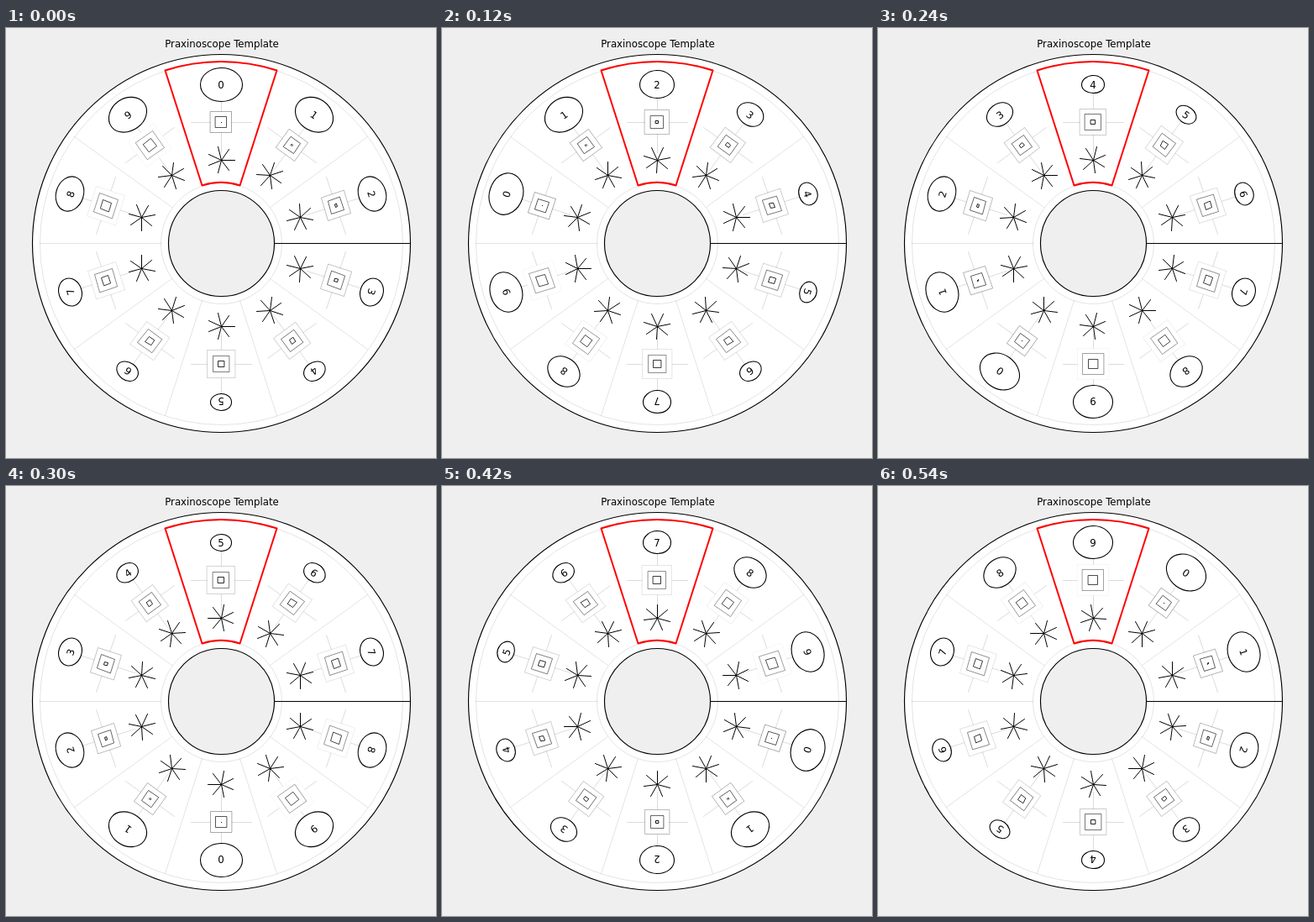
An HTML page that plays this animation: 512 by 512 pixels, repeating every 0.6 s.

```html
<!DOCTYPE html>
<html lang="en">
<head>
<meta charset="utf-8">
<title>Praxinoscope Template</title>
<style>
  html, body { margin: 0; width: 100%; height: 100%; overflow: hidden; background: #efefef; }
  svg { display: block; width: 100vw; height: 100vh; }
  text { font: 11.75px "DejaVu Sans", sans-serif; text-anchor: middle; fill: #000; }
</style>
</head>
<body>
<svg id="stage" viewBox="0 0 512 512" fill="none" stroke-linecap="round">
  <text x="257" y="23">Praxinoscope Template</text>
</svg>
<script>
const COUNT = 10, STEP = 60;
const MID = 256, OUTER = 225, HOLE = 63, RIM = 216, CORE = 72;
const MIDDLE = (RIM + CORE) / 2;
const BOX = 38.8, SPOKES = 7;
const GUIDE = 'rgba(0,0,0,.11)', CROSS = 'rgba(0,0,0,.14)';
const TAU = Math.PI * 2;
const svg = document.getElementById('stage');

function add(parent, tag, attrs) {
  const el = document.createElementNS('http://www.w3.org/2000/svg', tag);
  for (const key in attrs) el.setAttribute(key, attrs[key]);
  parent.appendChild(el);
  return el;
}

// Vertices sit on pixel centres, as in a stroke-normalising renderer.
const snap = v => Math.floor(v + 0.001) + 0.5;
const pair = p => p.map(v => +v.toFixed(3)).join(' ');
const polyline = points => 'M' + points.map(pair).join('L');

function polar(r, a) {
  return [snap(MID + r * Math.cos(a)), snap(MID + r * Math.sin(a))];
}

function ring(r, stroke, fill = 'none', width = 1) {
  add(svg, 'circle', { cx: MID + 0.5, cy: MID + 0.5, r, stroke, fill, 'stroke-width': width });
}

// Local wedge coordinates: origin mid-wedge, y pointing to the hub.
function wedge(slot) {
  const a = slot * TAU / COUNT, c = Math.cos(a), s = Math.sin(a);
  const turn = (x, y) => [x * c - y * s, x * s + y * c];
  const place = (x, y) => turn(x, y - MIDDLE).map(v => MID + v);
  const at = (x, y) => place(x, y).map(snap);
  return { turn, place, at };
}

function ellipsePath(w, y, rx, ry) {
  const k = 0.5523;
  const nodes = [[1, 0], [0, 1], [-1, 0], [0, -1]].map(([u, v]) => ({
    p: w.at(u * rx, y + v * ry),
    t: w.turn(-v * rx * k, u * ry * k)
  }));
  let d = 'M' + pair(nodes[0].p);
  nodes.forEach((n, i) => {
    const m = nodes[(i + 1) % 4];
    const c1 = [n.p[0] + n.t[0], n.p[1] + n.t[1]];
    const c2 = [m.p[0] - m.t[0], m.p[1] - m.t[1]];
    d += 'C' + [c1, c2, m.p].map(pair).join(' ');
  });
  return d + 'Z';
}

function boxPath(w, size) {
  const h = size / 2;
  return polyline([w.at(-h, -h), w.at(h, -h), w.at(h, h), w.at(-h, h)]) + 'Z';
}

// The splat turns back by one spoke per loop.
function splatPath(w, pose) {
  let d = '';
  for (let i = 0; i < SPOKES; i++) {
    const a = (i - pose / COUNT) * TAU / SPOKES;
    d += polyline([w.at(0, 45), w.at(16 * Math.cos(a), 45 + 16 * Math.sin(a))]);
  }
  return d;
}

function makeSlot(slot) {
  const w = wedge(slot);
  const cross = polyline([w.at(-36, 0), w.at(36, 0)]) + polyline([w.at(0, -36), w.at(0, 36)]);
  add(svg, 'path', { d: cross, stroke: CROSS });
  const boxes = [2, 1, 0].map(level => ({
    level, el: add(svg, 'path', { stroke: '#000', fill: level === 2 ? '#fff' : 'none' })
  }));
  const oval = add(svg, 'path', { stroke: '#000', fill: '#fff', 'stroke-width': 1.1 });
  const splat = add(svg, 'path', { stroke: '#000' });
  const [x, y] = w.place(0, -44.5);
  const label = add(svg, 'text', {
    y: 4.3,
    transform: `translate(${x.toFixed(2)} ${y.toFixed(2)}) rotate(${slot * 360 / COUNT})`
  });

  return pose => {
    const diam = 30 + 10 * Math.cos(pose / COUNT * TAU);
    oval.setAttribute('d', ellipsePath(w, -45, diam * 0.625, diam / 2));
    for (const { level, el } of boxes) {
      const grow = (pose + level * COUNT) / (COUNT * 3);
      el.setAttribute('d', boxPath(w, BOX * grow));
      el.setAttribute('stroke-opacity', 1 - grow);
    }
    splat.setAttribute('d', splatPath(w, pose));
    label.textContent = pose;
  };
}

ring(OUTER, '#000', '#fff', 1.15);
ring(RIM, GUIDE);
ring(CORE, GUIDE);
for (let i = 0; i < COUNT; i++) {
  const a = (i + 0.5) * TAU / COUNT - TAU / 4;
  add(svg, 'path', { d: polyline([polar(CORE, a), polar(RIM, a)]), stroke: GUIDE });
}
ring(HOLE, '#000', '#efefef', 1.15);
add(svg, 'path', { d: polyline([polar(HOLE, 0), polar(OUTER, 0)]), stroke: '#000' });

const slots = Array.from({ length: COUNT }, (_, i) => makeSlot(i));

const corner = (r, side) => pair(polar(r, side * Math.PI / COUNT - TAU / 4));
add(svg, 'path', {
  d: `M${corner(RIM, -1)}A${RIM} ${RIM} 0 0 1 ${corner(RIM, 1)}` +
     `L${corner(CORE, 1)}A${CORE} ${CORE} 0 0 0 ${corner(CORE, -1)}Z`,
  stroke: '#f00', 'stroke-width': 2, 'stroke-linejoin': 'round'
});

let shown = -1;
function draw(ms) {
  const turn = Math.floor(ms / STEP) % COUNT;
  if (turn === shown) return;
  shown = turn;
  slots.forEach((update, i) => update((i + turn) % COUNT));
}

function tick() {
  draw(performance.now());
  requestAnimationFrame(tick);
}
tick();
</script>
</body>
</html>
```
